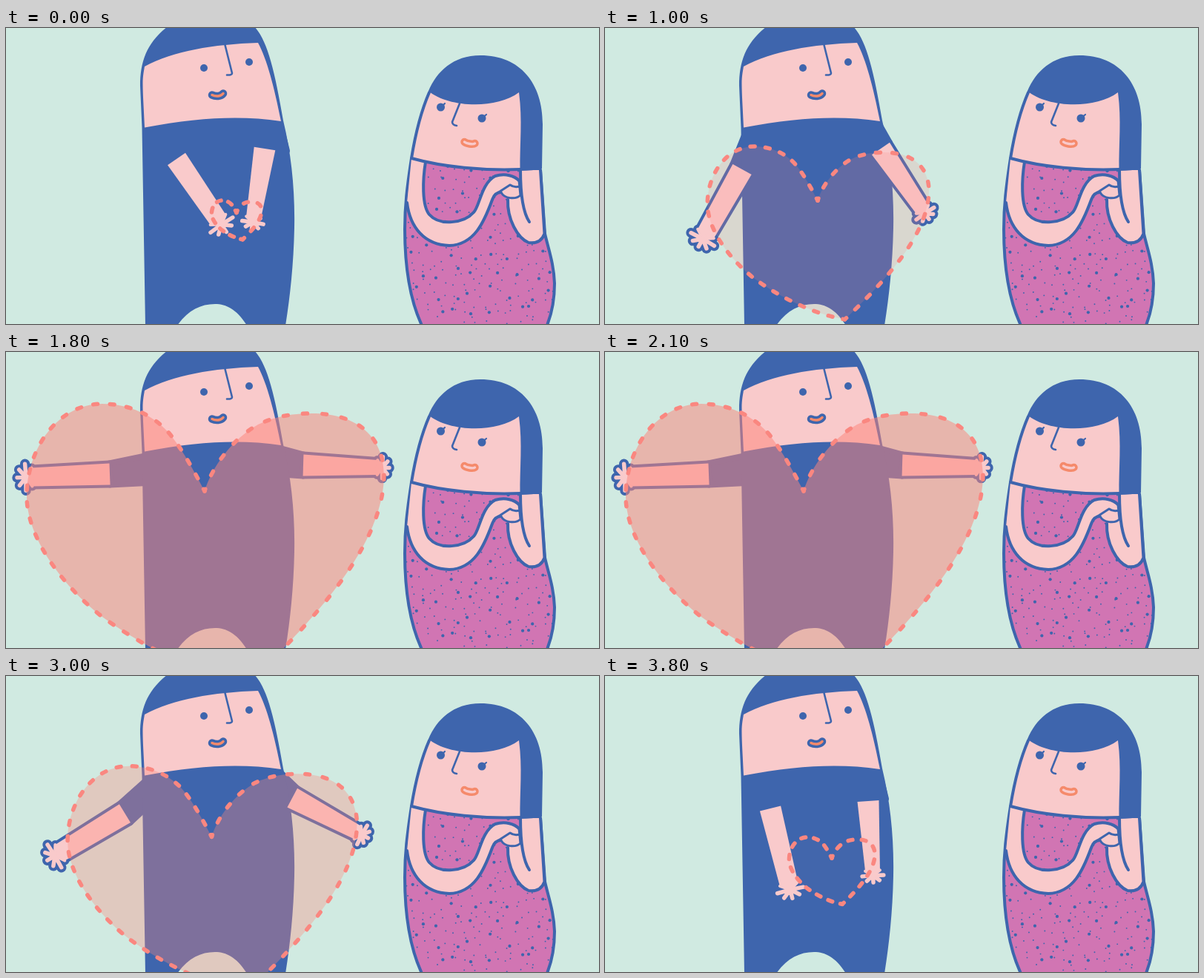
Recreate the animation shown at these times as an HTML page with a canvas. Size 800 px wide and 400 px high, loop 3.9 s.

```html
<!DOCTYPE html>
<html lang="en">
<head>
<meta charset="utf-8">
<title>Growing heart</title>
<style>
  html, body { margin: 0; width: 100%; height: 100%; overflow: hidden; background: #d0eae1; }
  canvas { display: block; }
</style>
</head>
<body>
<canvas id="stage" width="800" height="400"></canvas>
<script>
const ctx = document.getElementById('stage').getContext('2d');
const BG = '#d0eae1', BLUE = '#3e65ad', SKIN = '#f9cacb', DRESS = '#d175b3',
      ORANGE = '#f58a6b', CORAL = '#fa8780';

ctx.lineCap = ctx.lineJoin = 'round';

function shape(d, fill, stroke, width = 4) {
  const p = d instanceof Path2D ? d : new Path2D(d);
  if (fill) { ctx.fillStyle = fill; ctx.fill(p); }
  if (stroke) { ctx.strokeStyle = stroke; ctx.lineWidth = width; ctx.stroke(p); }
}

function dot(x, y, r, color = BLUE) {
  ctx.fillStyle = color;
  ctx.beginPath();
  ctx.arc(x, y, r, 0, Math.PI * 2);
  ctx.fill();
}

function polygon(points) {
  const p = new Path2D();
  points.forEach(([x, y]) => p.lineTo(x, y));
  p.closePath();
  return p;
}

function lips(d, outer, inner, width) {
  shape(d, null, outer, width);
  shape(d, null, inner, 3.5);
}

// ---- Arms: sleeve centre and wrist centre at key openings 0, 1, 3 and 5 ----
const LEFT = {
  side: 1, pivot: [195, 150], shoulder: [[190, 140], [190, 177]],
  sleeveWidth: 29, wristWidth: 25, reach: 20,
  keys: {
    0: [[230, 177], [286, 259]],
    1: [[223, 179], [248, 281]],
    3: [[185, 191], [136, 278]],
    5: [[140, 165], [35, 169]]
  }
};
const RIGHT = {
  side: -1, pivot: [370, 148], shoulder: [[370, 130], [379, 166]],
  sleeveWidth: 29, wristWidth: 20, reach: 16,
  keys: {
    0: [[349, 163], [334, 256]],
    1: [[355, 169], [361, 263]],
    3: [[372, 163], [428, 245]],
    5: [[401, 153], [501, 156]]
  }
};

// Halfway between two points, swinging around a pivot.
function swing([ax, ay], [bx, by], [px, py]) {
  const from = Math.atan2(ay - py, ax - px);
  let turn = Math.atan2(by - py, bx - px) - from;
  turn = Math.atan2(Math.sin(turn), Math.cos(turn));
  const r = (Math.hypot(ax - px, ay - py) + Math.hypot(bx - px, by - py)) / 2;
  return [px + r * Math.cos(from + turn / 2), py + r * Math.sin(from + turn / 2)];
}

function armPose(arm, open) {
  const { keys, pivot } = arm;
  const [sleeve, wrist] = keys[open] ||
    keys[open - 1].map((p, i) => swing(p, keys[open + 1][i], pivot));
  const angle = Math.atan2(wrist[1] - sleeve[1], wrist[0] - sleeve[0]);
  const along = ([x, y], turn, r) => [x + r * Math.cos(angle + turn), y + r * Math.sin(angle + turn)];
  const across = (p, width) => [1, -1].map(s => along(p, s * arm.side * Math.PI / 2, width / 2));
  return {
    cuff: across(sleeve, arm.sleeveWidth),
    wrist: across(wrist, arm.wristWidth),
    palm: along(wrist, 0, arm.reach * 0.4),
    tips: [-2, -1, 0, 1, 2].map(i => along(wrist, i * 0.56, arm.reach))
  };
}

function limb({ cuff: [a, b], wrist: [c, d], palm, tips }, color, extra) {
  shape(polygon([a, b, d, c]), color, extra && color, extra);
  shape(polygon([c, d, palm]), color, color, 4 + extra);
  const fingers = new Path2D();
  for (const t of tips) {
    fingers.moveTo(...palm);
    fingers.lineTo(...t);
  }
  shape(fingers, null, color, 5.5 + extra);
}

// ---- Man ----
function man(open) {
  const arms = [LEFT, RIGHT].map(arm => armPose(arm, open));
  arms.forEach((pose, i) => {
    const [top, bottom] = (i ? RIGHT : LEFT).shoulder;
    limb(pose, BLUE, 8);
    shape(polygon([top, ...pose.cuff, bottom]), BLUE, BLUE, 8);
  });
  shape('M188 402 L183.5 135 L181 78 C181 45 190 20 218 -2 L333 -4 C352 14 362 55 374 125 ' +
        'C385 170 390 220 389 270 C388 320 383 365 377 402 L325 402 ' +
        'C312 381 298 373 282 373 C262 373 245 382 231 402 Z', BLUE);
  arms.forEach(pose => limb(pose, SKIN, 0));

  shape('M187 52 C225 31 280 22 340 20 C352 42 362 80 371 126 C315 118 260 121 187 134.5 ' +
        'C186 110 184.5 90 184.5 75 C184.5 65 186 58 187 52 Z', SKIN);
  shape('M295 21 L305 61 Q305 64 298 63.5', null, BLUE, 2.6);
  dot(267, 54, 5);
  dot(328, 46, 5);
  lips('M278 90.5 C283 93 290 92.5 293 88.5', BLUE, ORANGE, 10.5);
}

// ---- Woman ----
const BODY = new Path2D('M547 176 C541 215 538 240 538 272 C538 330 548 375 562 404 L729 404 ' +
  'C737 385 740 365 740 345 C739 318 732 300 727 278 L721 192 Z');

// Dots on a jittered grid, the same every time.
function scatter(step, r, seed) {
  const rnd = () => (seed = seed * 16807 % 2147483647) / 2147483647;
  for (let y = 184; y < 404; y += step)
    for (let x = 540; x < 744; x += step)
      dot(x + rnd() * step * 0.85, y + rnd() * step * 0.85, r);
}

function woman() {
  shape(BODY, DRESS);
  ctx.save();
  ctx.clip(BODY);
  scatter(14, 0.95, 7);
  scatter(27, 2.1, 4321);
  ctx.restore();
  shape(BODY, null, BLUE);

  // Right arm
  const elbow = 'L726.500 278 C722 290 712 291 705 290 C690 284 676 258 677 232';
  shape('M694 192 L721 192 ' + elbow + ' L692 226 Z', SKIN);
  shape('M721 192 ' + elbow, null, BLUE);
  shape('M694 192 C694 230 698 250 706 262', null, BLUE);

  // Left arm
  const inner = 'M566 181 C562 205 561 240 571 252 C585 268 618 264 631 249 ' +
    'C639 241 641 210 660 200 C674 196 686 200 692 206';
  const outer = 'C661 222 658 226 656 232 C645 262 632 293 598 294 C565 293 545 270 541 236';
  shape(inner + ' L692 216 L668 222 ' + outer + ' L547 176 Z', SKIN);
  shape(inner, null, BLUE);
  shape('M668 222 ' + outer, null, BLUE);

  // Clasped hands
  shape('M668 222 C672 231 688 232 694 226 L694 214 L680 212 Z', SKIN);
  shape('M663 223 L680 212 C684 215 689 215 693 214 M668 222 C672 231 688 232 694 226 L692 206',
        null, BLUE, 3);

  // Head
  const jaw = 'M571 87 C561 110 552 145 547 176 C590 188 645 193 694 191';
  shape(jaw + ' L697 87 Z', SKIN);
  shape(jaw, null, BLUE);
  shape('M570 85 C581 59 603 37 640 37 C694 37 724 75 724 130 L723 190 C715 192 705 193 693.500 193 ' +
        'C693 155 697 125 692 87 C660 111 595 107 570 85 Z', BLUE);
  dot(586.5, 107, 5.5);
  dot(642, 122, 5.5);
  shape('M588 106 L592 102 M643 121 L648 117', null, BLUE, 2.2);
  shape('M612 102 L602 127 Q602 131 608 132', null, BLUE, 2.6);
  lips('M618.500 154 C621 156 630 158 632.500 156', ORANGE, SKIN, 10.5);
}

// ---- Heart, shrinking around its top left corner ----
function half(d, pitch) {
  const el = document.createElementNS('http://www.w3.org/2000/svg', 'path');
  el.setAttribute('d', d);
  return { path: new Path2D(d), length: el.getTotalLength(), pitch };
}
const HALVES = [
  half('M268 188 C253 160 240 135 222 112 C200 85 165 70 130 70 ' +
       'C70 70 28 130 28 195 C28 250 75 315 130 358 C190 402 265 437 327 447', 22.5),
  half('M268 188 C278 155 305 118 340 98 C365 86 390 83 412 83 ' +
       'C475 83 510 115 510 168 C508 250 440 340 327 447', 26)
];
const DASH = 6;

function heart(pose) {
  const s = Math.max(0.14, 1 - 0.19 * (5 - Math.min(pose, 5)));
  const x = 28 + 290 * (1 - s);
  const y = 70 + (1 - s) * (187 + 130 * s * s);
  const place = new DOMMatrix([s, 0, 0, s, x - 28 * s, y - 70 * s]);
  const paths = HALVES.map(h => {
    const p = new Path2D();
    p.addPath(h.path, place);
    return p;
  });

  const area = new Path2D();
  paths.forEach(p => area.addPath(p));
  ctx.fillStyle = `rgba(253, 133, 123, ${0.0205 * pose * pose})`;
  ctx.fill(area, 'evenodd');

  // A whole number of dashes per side, centred on notch and tip.
  HALVES.forEach(({ length, pitch }, i) => {
    const size = length * s;
    const period = size / Math.round(size / (16 + (pitch - 16) * s));
    ctx.setLineDash([DASH, period - DASH]);
    ctx.lineDashOffset = DASH / 2;
    shape(paths[i], null, CORAL, 5.5);
  });
  ctx.setLineDash([]);
}

// ---- Playback: opens, rests, closes again ----
const STEP = 100, SLOTS = 13, WIDEST = 6;
const start = performance.now();
let shown = -1;

function frame() {
  const slot = Math.floor((performance.now() - start) / STEP) % SLOTS;
  const pose = Math.min(slot, SLOTS - slot, WIDEST);
  if (pose !== shown) {
    shown = pose;
    ctx.fillStyle = BG;
    ctx.fillRect(0, 0, 800, 400);
    woman();
    man(Math.min(pose, 5));
    heart(pose);
  }
  requestAnimationFrame(frame);
}
frame();
</script>
</body>
</html>
```
